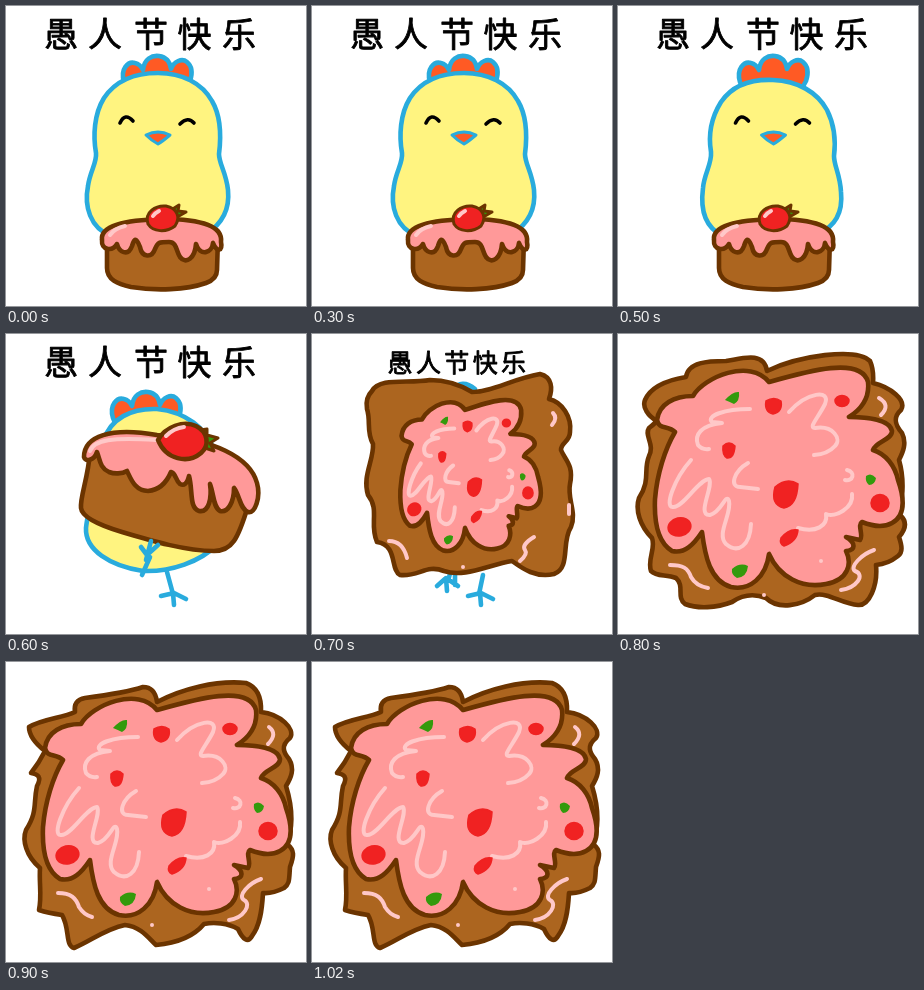
Recreate the animation shown at these times as an HTML page without scripts. Size 300 by 300 pixels, loop 1.1 s.

```html
<!DOCTYPE html>
<html lang="zh">
<head>
<meta charset="utf-8">
<title>愚人节快乐</title>
<style>
html, body { margin: 0; width: 100%; height: 100%; overflow: hidden; background: #fff; }
svg { display: block; width: 100vw; height: 100vh; }
path, ellipse { stroke-linecap: round; stroke-linejoin: round; vector-effect: non-scaling-stroke; }
text { font: 500 34px "Noto Sans CJK SC", "Noto Sans CJK", sans-serif; stroke: #000; stroke-width: .8; stroke-linejoin: round; }

.blue { stroke: #29abdd; stroke-width: 4.6; fill: none; }
.yellow { fill: #fff480; }
.orange { fill: #ff5a24; }
.edge { stroke: #6b3400; stroke-width: 4.6; }
.cake { fill: #ac651f; }
.pink { fill: #f99; }
.red { fill: #f02222; }
.green { fill: #339a0c; }
.dots { stroke: #f02222; stroke-width: 1.5; }
.thin { stroke-width: 3; }
.eye { fill: none; stroke: #000; stroke-width: 3.6; }
.shine { fill: none; stroke: #ffc8c8; stroke-width: 4; }

/* hard cuts between poses */
.pose { visibility: hidden; animation: 1.1s step-end infinite; }
.rest { animation-name: rest; }
.lean { animation-name: lean; }
.small { animation-name: small; }
.lift { animation-name: lift; }
.title { animation-name: title; }
.tilt { animation-name: tilt; }
.near { animation-name: near; }
.hit { animation-name: hit; }
.icing { animation-name: icing; }
@keyframes rest { 0% { visibility: visible } 45.4545%, 100% { visibility: hidden } }
@keyframes lean { 0% { visibility: hidden } 45.4545% { visibility: visible } 54.5455%, 100% { visibility: hidden } }
@keyframes small { 0% { visibility: visible } 54.5455%, 100% { visibility: hidden } }
@keyframes lift { 0% { visibility: hidden } 54.5455% { visibility: visible } 63.6364%, 100% { visibility: hidden } }
@keyframes title { 0% { visibility: visible } 63.6364%, 100% { visibility: hidden } }
@keyframes tilt { 0% { visibility: hidden } 63.6364% { visibility: visible } 72.7273%, 100% { visibility: hidden } }
@keyframes near { 0% { visibility: hidden } 72.7273% { visibility: visible } 81.8182%, 100% { visibility: hidden } }
@keyframes hit { 0% { visibility: hidden } 81.8182%, 100% { visibility: visible } }
@keyframes icing { 0% { visibility: hidden } 72.7273%, 100% { visibility: visible } }
</style>
</head>
<body>
<svg viewBox="0 0 300 300">
<defs>
  <path id="comb" class="blue orange" d="M122 86L118 76C114 63 122 55 129 57Q134 58 137 64C138 53 146 49 153 50C160 51 164 56 165 63C168 55 176 52 181 56C187 61 186 69 184 75L178 86Z"/>
  <g id="face">
    <path class="eye" d="M114 117Q119 106 127 115M174 118Q182 110 188 117"/>
    <path class="blue orange thin" d="M140 129Q152 123 164 129Q157 135 152 138Q146 135 140 129Z"/>
  </g>
  <path id="foot" class="blue" d="M155 262L168 259L180 265M167 259L168 271"/>
  <g id="topping">
    <path class="edge pink" d="M57 98C50 91 41 96 39 86C41 70 56 62 75 62C86 43 132 24 151 48C190 37 243 22 250 48C252 66 242 76 231 83C250 83 272 86 274 97C274 106 258 107 255 116C268 120 277 132 280 146C287 166 287 182 274 189C265 194 254 192 244 188C239 191 246 202 242 206L228 203C238 209 238 216 228 217C234 229 231 246 208 250C184 255 161 243 151 220C148 243 132 257 113 253C92 247 87 222 84 198C76 210 67 220 54 217C39 208 36 188 37 165C39 140 47 115 57 98Z"/>
    <path class="shine" d="M132 75C106 75 88 82 94 88L104 89C83 91 76 101 80 111Q84 116 91 115M171 78C189 58 213 55 207 70C200 84 190 94 197 94C215 91 224 105 217 112Q210 120 196 121M130 129C116 137 111 153 122 153L140 155M73 126C56 145 46 174 55 173C65 174 80 146 91 145C96 152 78 182 92 181C104 178 108 158 111 167C114 180 98 200 108 210C120 220 132 212 133 190M229 136C238 138 235 148 227 146M234 160C236 174 217 184 208 180C210 192 198 199 180 194"/>
    <g class="red dots">
      <path d="M148 67Q156 62 163 67Q165 78 155 80Q146 78 148 67Z"/>
      <ellipse cx="224" cy="67" rx="7" ry="5.500"/>
      <path d="M105 112Q111 106 117 112Q116 125 109 124Q104 121 105 112Z"/>
      <path d="M157 153Q169 143 180 150Q179 172 166 174Q152 171 157 153Z"/>
      <ellipse cx="61.500" cy="193" rx="11.500" ry="9" transform="rotate(-12 61 193)"/>
      <path d="M163 204Q171 194 180 196Q179 208 166 212Q161 210 163 204Z"/>
      <ellipse cx="262" cy="169" rx="9" ry="8.500"/>
    </g>
    <path class="green" d="M107 66Q115 57 121 58Q122 67 116 70Q112 68 107 66ZM248 142Q253 138 258 144Q257 151 251 151Q247 148 248 142ZM114 235Q122 228 130 232Q129 243 119 244Q113 241 114 235Z"/>
  </g>
</defs>
<rect width="300" height="300" fill="#fff"/>

<g class="pose rest">
  <use href="#comb"/>
  <path class="blue yellow" d="M105 230C84 222 78 200 82 180C84 165 91 157 90 147C87 130 88 108 98 92C110 74 130 67 152 67C176 67 196 77 206 95C216 112 215 132 213 148C213 158 220 166 222 184C224 204 216 218 200 228Z"/>
  <use href="#face"/>
</g>
<g class="pose lean">
  <use href="#comb" x="4"/>
  <path class="blue yellow" d="M105 230C88 222 82 205 85 182C86 168 94 158 93 146C90 128 93 112 103 96C114 80 132 73 155 74C180 75 199 86 209 104C217 120 218 134 216 150C216 160 222 168 223 186C225 206 218 220 200 228Z"/>
  <use href="#face" x="3.500"/>
</g>

<g class="pose small">
  <path class="edge cake" d="M101 232L101 262C101 274 112 278 125 281C150 285 180 284 200 277Q211 273 211 264L212 232Z"/>
  <path class="edge pink" d="M96 234C94 220 118 214 156 213C198 213 217 221 215 236C217 245 211 247 207 237C206 247 194 251 190 238C189 252 180 259 174 251C170 245 171 236 163 236C153 236 152 236 149 243C146 252 136 252 134 241C130 230 128 233 126 240C122 251 113 246 111 238C106 246 95 244 96 234Z"/>
  <path class="shine" d="M104 229Q109 222 119 220"/>
  <path class="edge green thin" d="M165 204L173 199L172 205L180 206L173 210L168 212Z"/>
  <path class="edge red thin" d="M142 218C138 206 150 199 160 200C171 202 175 211 169 220C160 227 147 226 142 218Z"/>
  <path class="shine thin" d="M147 210Q149 207 153 205"/>
</g>

<g class="pose lift">
  <use href="#comb" x="-11" y="8"/>
  <path class="blue yellow" d="M97 108C104 84 126 74 151 75C180 78 200 94 208 116L212 210C194 228 165 238 137 237C104 232 79 216 80 194C82 174 90 150 97 108Z"/>
  <path class="blue" d="M161 238L167 260"/>
  <use href="#foot"/>
  <path class="edge cake" d="M84 118C82 145 74 162 75 174C76 184 96 192 116 198C146 207 180 217 208 217C226 217 232 205 242 172L215 125Z"/>
  <path class="blue" d="M145 207L140 226M144 223L136 241M135 213L141 221M152 211L142 220"/>
  <path class="edge pink" d="M78 123C78 102 105 93 151 101C207 105 244 123 251 149C255 163 249 180 242 178C234 175 234 162 228 154C228 168 222 179 214 177C207 173 208 160 204 150C206 164 203 179 193 177C183 174 187 156 183 142C181 150 178 152 174 150C169 146 170 139 165 138C160 150 153 156 142 157C129 157 125 145 121 137C116 140 108 140 103 138C94 134 94 126 91 118C88 127 79 128 78 123Z"/>
  <path class="shine" stroke-width="6" d="M84 117C88 106 106 103 150 106"/>
  <path class="edge green thin" d="M194 96L201 95L201 101L212 104L204 109L208 117L199 114Z"/>
  <path class="edge red" d="M152 106C159 93 178 86 190 92C202 98 204 111 195 119C182 130 160 126 152 106Z"/>
  <path class="shine" d="M160 102Q168 94 178 93"/>
</g>

<text class="pose title" x="38 82 128 171.500 216" y="40.500">愚人节快乐</text>

<g class="pose tilt">
  <path class="blue orange" d="M140 56Q150 44 163 55Z"/>
  <path class="blue" d="M139 236L136 247M143 238L143 251M125 252L134 244L146 252M134 244L135 257M171 241L167 260"/>
  <use href="#foot" x="1"/>
  <path class="edge cake" d="M60 57C68 43 96 50 118 46C136 46 150 52 160 58C180 58 200 45 228 40C240 43 241 54 237 65C250 68 260 83 258 98C258 108 249 108 249 116C253 126 262 131 258 150C255 165 265 178 259 193C249 208 259 234 242 240C224 244 211 235 200 227C176 231 152 244 132 237C114 230 107 243 88 241C78 236 86 211 65 208C57 190 68 176 56 161C50 142 62 126 61 110C54 98 59 87 55 75Q53 64 60 57Z"/>
  <path class="shine" d="M77 207C86 207 92 212 95 224M241 79Q246 84 240 91M222 203Q209 211 213 216Q216 220 208 227M257 171L257 180M151 233L151 233"/>
  <use href="#topping" transform="matrix(.567 0 0 .686 67.400 43)"/>
  <text x="75.500" y="37.500" style="font-size:25px;letter-spacing:3.4px">愚人节快乐</text>
</g>

<g class="pose near">
  <path class="edge cake" d="M39 87C30 82 24 73 27 66C33 52 50 46 68 43C70 28 90 27 108 27C122 25 146 16 149 37C180 22 238 13 252 27Q256 36 255 49C272 53 289 66 283 76C274 84 278 92 284 99C289 109 285 118 281 126C287 147 284 164 282 181C290 188 287 196 281 203C284 212 285 218 280 222Q270 230 258 231C260 252 251 272 240 271C224 270 210 258 197 261C183 272 160 276 148 264C138 260 127 259 114 268C98 274 80 275 67 270C58 263 67 252 58 244C48 240 39 243 33 237C29 225 38 215 34 204C22 192 17 176 21 164C33 145 25 137 31 122C37 110 26 102 31 94Q35 91 39 87Z"/>
  <path class="shine" d="M52 231C65 231 70 234 73 243Q78 252 90 254M256 216C244 220 231 233 237 237C248 241 238 254 223 256M261 64Q273 71 263 81M146 261L146 261"/>
</g>
<g class="pose hit">
  <path class="edge cake" d="M39 89C30 82 23 74 23 65C36 57 56 56 69 50Q67 38 79 36C102 33 122 30 137 25Q149 25 151 40C176 27 210 18 240 21Q256 27 255 50C274 52 290 67 284 76C274 84 278 91 283 97C289 107 285 116 280 124C288 150 286 167 281 182C289 188 288 194 284 205C283 217 284 222 278 226Q266 232 257 231C256 248 254 264 246 274C242 281 237 278 232 267C222 261 208 260 198 262C188 274 172 281 150 283C143 277 136 265 119 263C99 267 85 279 68 286C59 284 64 266 56 253Q42 251 33 248C36 234 33 222 34 206C20 194 16 178 20 168C32 149 27 142 31 124C36 115 32 112 25 111Q33 101 39 89Z"/>
  <path class="shine" d="M52 231C65 231 70 236 73 245Q78 253 86 255M255 217C243 221 231 234 238 238C246 242 238 256 223 258M263 65Q272 72 262 82M146 263L146 263"/>
</g>
<g class="pose icing">
  <use href="#topping"/>
  <path class="shine" d="M203 227L203 227"/>
</g>
</svg>
</body>
</html>
```
